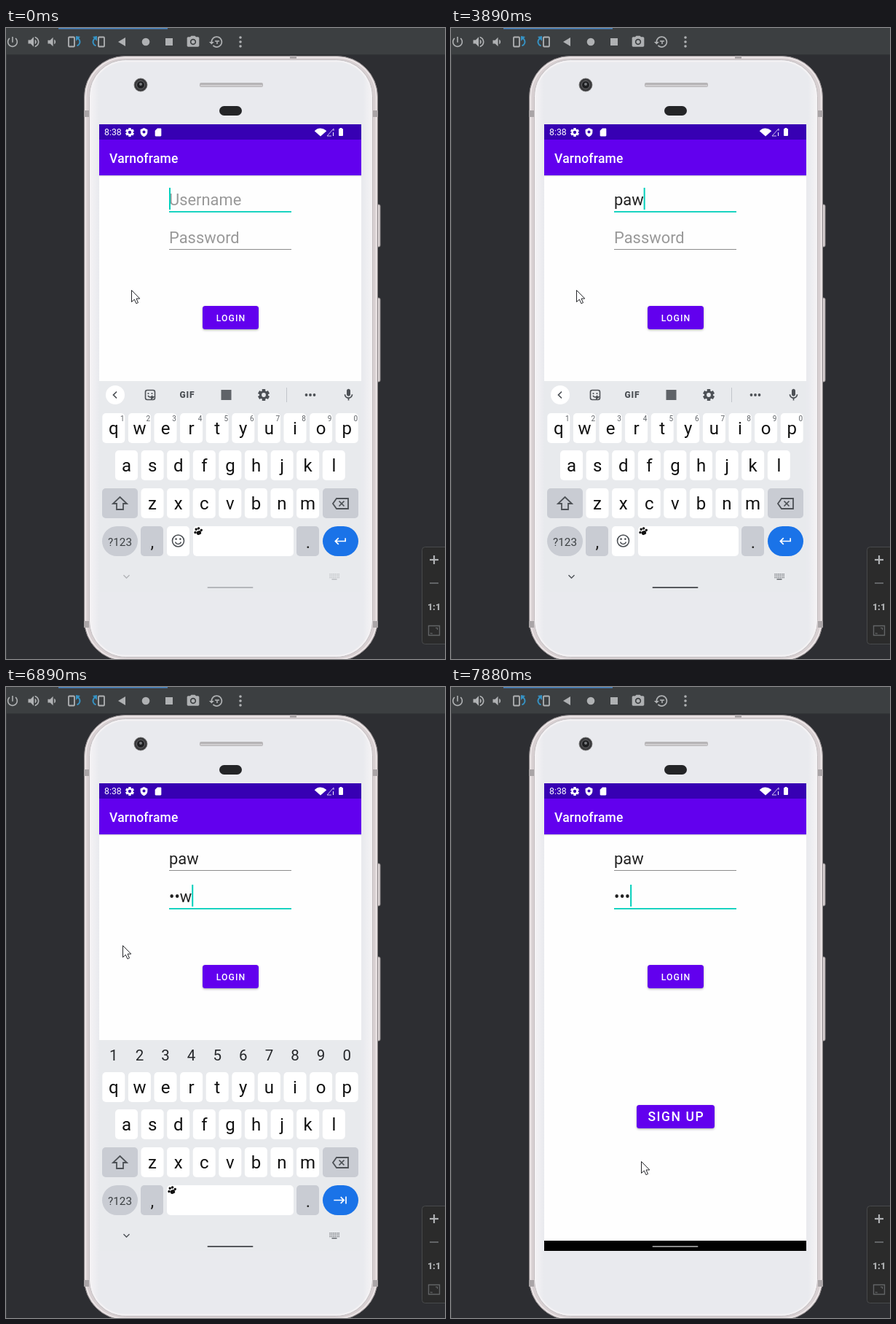
An HTML page with a canvas for the animation above (8 s loop, 603x865 px).

```html
<!DOCTYPE html>
<html lang="en">
<head>
<meta charset="utf-8">
<title>Login demo</title>
<style>
html, body { margin: 0; width: 100%; height: 100%; overflow: hidden; background: #2d2e32; }
canvas { display: block; width: 603px; height: 865px; }
</style>
</head>
<body>
<canvas id="stage" width="603" height="865"></canvas>
<script>
const c = document.getElementById('stage').getContext('2d');
const LOOP = 8000;
const PURPLE = '#6200ee', TEAL = '#03cfbb', KEYS = '#e8eaed', MOD = '#c9ccd3', INK = '#4d5156', TOOL = '#afb1b3';

// Step timelines: [start ms, value...]
const USER = [[0, ''], [1480, 'p'], [1600, 'pa'], [1910, 'paw']];
const PASS = [[0, ''], [5000, 'p'], [5400, '•a'], [5770, '••w'], [7280, '•••']];
const CARET = [[0, 1], [150, 0], [540, 1], [1080, 0], [1480, 1], [2430, 0], [2960, 1], [3360, 0], [3890, 1],
  [4700, 0], [5000, 1], [6310, 0], [6740, 1], [7280, 0], [7730, 1]];
const NAV = [[0, .35], [150, .5], [420, .6], [540, .7], [810, .85], [1080, 1]];
const MOUSE = [[0, 172, 359], [4700, 170, 360], [4850, 168, 361], [5770, 165, 355], [5920, 162, 344], [6040, 161, 339],
  [6860, 160, 354], [7010, 158, 470], [7160, 160, 620], [7280, 164, 738], [7430, 166, 755], [7580, 177, 733],
  [7730, 182, 728], [7880, 261, 650]];

const ICON = {
  power: 'M13 3h-2v10h2V3zm4.83 2.17l-1.42 1.42C17.99 7.86 19 9.81 19 12c0 3.87-3.13 7-7 7s-7-3.13-7-7c0-2.19 1.01-4.14 2.58-5.42L6.17 5.17C4.23 6.82 3 9.26 3 12c0 4.97 4.03 9 9 9s9-4.03 9-9c0-2.74-1.23-5.18-3.17-6.83z',
  loud: 'M3 9v6h4l5 5V4L7 9H3zm13.5 3c0-1.77-1.02-3.29-2.5-4.03v8.05c1.48-.73 2.5-2.25 2.5-4.02zM14 3.23v2.06c2.89.86 5 3.54 5 6.71s-2.11 5.85-5 6.71v2.06c4.01-.91 7-4.49 7-8.77s-2.99-7.86-7-8.77z',
  quiet: 'M5 9v6h4l5 5V4L9 9H5zm13.5 3c0-1.77-1.02-3.29-2.5-4.03v8.05c1.48-.73 2.5-2.25 2.5-4.02z',
  camera: 'M9 2L7.17 4H4c-1.1 0-2 .9-2 2v12c0 1.1.9 2 2 2h16c1.1 0 2-.9 2-2V6c0-1.1-.9-2-2-2h-3.17L15 2H9zm3 15c-2.76 0-5-2.24-5-5s2.24-5 5-5 5 2.24 5 5-2.24 5-5 5z',
  history: 'M13 3c-4.97 0-9 4.03-9 9H1l4 4 4-4H6c0-3.87 3.13-7 7-7s7 3.13 7 7-3.13 7-7 7c-1.93 0-3.68-.79-4.94-2.06l-1.42 1.42C8.27 19.99 10.51 21 13 21c4.97 0 9-4.03 9-9s-4.03-9-9-9z',
  shield: 'M12 1L3 5v6c0 5.55 3.84 10.74 9 12 5.16-1.26 9-6.45 9-12V5l-9-4z',
  card: 'M18 2h-8L4 8v12c0 1.1.9 2 2 2h12c1.1 0 2-.9 2-2V4c0-1.1-.9-2-2-2z',
  mic: 'M12 14c1.66 0 3-1.34 3-3V5c0-1.66-1.34-3-3-3S9 3.34 9 5v6c0 1.66 1.34 3 3 3zm5-3c0 2.76-2.24 5-5 5s-5-2.24-5-5H5c0 3.53 2.61 6.43 6 6.92V21h2v-3.08c3.39-.49 6-3.39 6-6.92h-2z',
  enter: 'M19 7v4H5.83l3.58-3.59L8 6l-6 6 6 6 1.41-1.41L5.83 13H21V7z',
  tab: 'M11.59 7.41L15.17 11H1v2h14.17l-3.59 3.59L13 18l6-6-6-6-1.41 1.41zM20 6v12h2V6h-2z'
};
const SHAPE = {};
for (const id in ICON) SHAPE[id] = Reflect.construct(Path2D, [ICON[id]]);

function at(list, t) {
  let hit = list[0];
  for (const row of list) if (row[0] <= t) hit = row;
  return hit;
}
function rect(x, y, w, h, fill) {
  c.fillStyle = fill;
  c.fillRect(x, y, w, h);
}
function round(x, y, w, h, r, fill, stroke, lw = 1) {
  c.beginPath();
  c.roundRect(x, y, w, h, r);
  if (fill) { c.fillStyle = fill; c.fill(); }
  if (stroke) { c.strokeStyle = stroke; c.lineWidth = lw; c.stroke(); }
}
function disc(x, y, r, fill, stroke, lw = 1) {
  round(x - r, y - r, 2 * r, 2 * r, r, fill, stroke, lw);
}
function line(color, lw, ...pts) {
  c.beginPath();
  for (let i = 0; i < pts.length; i += 2) c.lineTo(pts[i], pts[i + 1]);
  c.strokeStyle = color;
  c.lineWidth = lw;
  c.stroke();
}
function poly(fill, ...pts) {
  c.beginPath();
  for (let i = 0; i < pts.length; i += 2) c.lineTo(pts[i], pts[i + 1]);
  c.closePath();
  c.fillStyle = fill;
  c.fill();
}
function text(s, x, y, size, color, { weight = 400, align = 'left', gap = 0 } = {}) {
  c.font = `${weight} ${size}px Roboto, sans-serif`;
  c.letterSpacing = gap + 'px';
  c.textAlign = align;
  c.fillStyle = color;
  c.fillText(s, x, y);
  const w = c.measureText(s).width;
  c.letterSpacing = '0px';
  return w;
}
function icon(name, x, y, size, color) {
  c.save();
  c.translate(x - size / 2, y - size / 2);
  c.scale(size / 24, size / 24);
  c.fillStyle = color;
  c.fill(SHAPE[name]);
  c.restore();
}
function gear(x, y, r, color, hole) {
  c.save();
  c.translate(x, y);
  for (let i = 0; i < 6; i++) {
    c.rotate(Math.PI / 3);
    rect(-r * .28, -r, r * .56, r, color);
  }
  c.restore();
  disc(x, y, r * .76, color);
  disc(x, y, r * .36, hole);
}

function toolbar() {
  rect(0, 0, 603, 865, '#2d2e32');
  rect(0, 0, 603, 36, '#3c3f41');
  rect(0, 36, 603, 1, '#323537');
  rect(0, 36, 1, 829, '#3b3d40');
  rect(72, 0, 150, 1.5, '#4a88c7');
  icon('power', 9, 19, 19, TOOL);
  icon('loud', 38, 19, 20, TOOL);
  icon('quiet', 63, 19, 19, TOOL);
  for (const [x, dir] of [[94, 1], [127, -1]]) {
    c.save();
    c.translate(x, 19);
    c.scale(dir, 1);
    round(-8, -6.5, 8, 13, 1, null, TOOL, 1.8);
    c.beginPath();
    c.arc(2, 0, 5.5, -1.2, 1.3);
    c.strokeStyle = '#3592c4';
    c.lineWidth = 2;
    c.stroke();
    poly('#3592c4', 2, -8, 2, -1, 8, -7);
    c.restore();
  }
  poly(TOOL, 154, 19, 164, 13, 164, 25);
  disc(192, 19, 5.3, TOOL);
  rect(219, 14, 10, 10, TOOL);
  icon('camera', 257, 19, 20, TOOL);
  disc(257, 19, 2.5, TOOL);
  icon('history', 288.5, 19, 21, TOOL);
  line(TOOL, 1.6, 287, 18, 293, 18);
  line(TOOL, 1.6, 290, 18, 290, 22);
  for (let i = -1; i < 2; i++) disc(322, 19 + i * 6, 1.8, TOOL);
}

function zoomPanel() {
  round(571.5, 711.5, 40, 133, 4, '#2b2b2b', '#484a4c');
  line(TOOL, 2.2, 582, 729, 594, 729);
  line(TOOL, 2.2, 588, 723, 588, 735);
  line('#626466', 2, 582, 761, 594, 761);
  text('1:1', 588, 798, 12.5, TOOL, { weight: 800, align: 'center' });
  round(580.5, 819.5, 15, 13, 0, null, '#626466', 1.4);
  line('#626466', 1.2, 583.5, 829, 583.5, 830, 586, 830);
  line('#626466', 1.2, 590, 822.5, 592.5, 822.5, 592.5, 825);
}

function phone() {
  for (const [y, h] of [[242, 58], [370, 115]]) round(509, y, 5, h, 2, '#d9d2d3', '#8d8889');
  round(107.5, 38.5, 403, 829, 56, '#d8d0d2', '#8f8a8c');
  round(109.5, 40.5, 399, 825, 54, null, '#efe9ea', 1.5);
  for (const y of [113, 813]) {
    rect(107, y, 7, 9, '#aaa5a7');
    rect(504, y, 7, 9, '#aaa5a7');
  }
  rect(390, 38, 9, 4, '#aaa5a7');
  const g = c.createLinearGradient(114, 0, 504, 0);
  g.addColorStop(0, '#f6f4f6');
  g.addColorStop(.035, '#e9eaee');
  g.addColorStop(.965, '#e9eaee');
  g.addColorStop(1, '#f6f4f6');
  round(114.5, 43.5, 389, 819, 50, g, '#c3bec0');
  round(116.5, 45.5, 385, 815, 48, null, '#f4f2f4', 2);
  disc(185, 78, 9, '#39393b', '#777', .8);
  disc(185, 78, 5.5, '#1d1e20', '#68686b', 1);
  disc(185, 77, 2, '#77797c');
  round(266, 75, 87, 6, 2, '#b7b5b7');
  rect(267, 78, 85, 2, '#cfcdcf');
  round(293, 107, 31, 13, 6.5, '#242527');
}

function button(label, x, y, w, size, base) {
  c.save();
  c.shadowColor = 'rgba(0,0,0,.3)';
  c.shadowBlur = 3;
  c.shadowOffsetY = 1.2;
  round(x, y, w, 32, 3.5, PURPLE);
  c.restore();
  const gap = size * .0893;
  text(label, x + w / 2 + gap / 2, base, size, '#fff', { weight: 500, align: 'center', gap });
}

function field(value, hint, y, focus, caret) {
  const w = text(value || hint, 224, y, 21.9, value ? '#212121' : '#999');
  if (focus) rect(224, y + 8, 168, 1.8, TEAL);
  else rect(224, y + 8, 168, 1, '#8c8c8c');
  if (focus && caret) rect(224 + (value ? w : 0), y - 24, 2, 30, TEAL);
}

function app(t) {
  rect(128, 132, 360, 641, '#fefefe');
  rect(128, 202, 360, 1, '#d9d9dc');
  rect(128, 203, 360, 1, '#f2f2f4');
  rect(128, 132, 360, 21, '#3700b3');
  rect(128, 153, 360, 49, PURPLE);
  text('8:38', 135, 147, 12.3, '#fff');
  gear(170, 143, 6, '#fff', '#3700b3');
  icon('shield', 189.5, 143, 13, '#fff');
  disc(189.5, 142.5, 2, '#3700b3');
  icon('card', 209, 143, 13, '#fff');
  c.beginPath();
  c.moveTo(432, 148.5);
  c.arc(432, 148.5, 11, -Math.PI * .77, -Math.PI * .23);
  c.fillStyle = '#fff';
  c.fill();
  line('#cfc3ee', 1, 441, 148, 450, 138, 450, 141);
  line('#cfc3ee', 1, 441, 148, 447, 148);
  line('#fff', 1, 449.5, 143, 449.5, 148);
  round(457, 138, 6, 10, 1, '#fff');
  rect(458.5, 137, 3, 2, '#fff');
  text('Varnoframe', 142, 184.5, 17.5, '#fff', { weight: 500, gap: .22 });

  const second = t >= 4170, caret = at(CARET, t)[1];
  field(at(USER, t)[1], 'Username', 243, !second, caret);
  field(at(PASS, t)[1], 'Password', 295, second, caret);
  button('LOGIN', 270, 381, 77, 12.25, 402);
  button('SIGN UP', 255, 573, 107, 17.5, 595);
}

function key(x, y, w, fill = '#fff', r = 5) {
  round(x, y, w, 41, r, fill);
}
function letters(row, x, y) {
  [...row].forEach((ch, i) => {
    const mid = x + i * 35.6;
    key(mid - 15.5, y, 31);
    text(ch, mid, y + 28.5, 24, '#111', { align: 'center' });
  });
}
function paw(x, y) {
  c.save();
  c.translate(x, y);
  c.rotate(-.35);
  for (const [dx, dy] of [[-4.3, 0], [-1.6, -3.6], [2, -3.6], [4.6, 0]]) disc(dx, dy, 1.7, '#111');
  round(-3.2, -.5, 6.6, 5.4, 2.6, '#111');
  c.restore();
}
function tools() {
  disc(150, 503, 13, '#fff');
  line(INK, 1.7, 152, 498.5, 147.5, 503, 152, 507.5);
  round(191.5, 496.5, 13, 13, 2.5, null, INK, 1.6);
  poly(INK, 199, 510, 199, 505, 205, 505);
  disc(195.5, 501, 1.1, INK);
  disc(200.5, 501, 1.1, INK);
  c.beginPath();
  c.arc(198, 503, 3, .2, 2.9);
  c.stroke();
  text('GIF', 249, 507, 12, INK, { weight: 900, align: 'center', gap: .8 });
  rect(295.5, 496, 14, 14, '#5f6368');
  gear(354, 503, 8, INK, KEYS);
  rect(385, 493, 1, 20, '#c2c5ca');
  for (let i = -1; i < 2; i++) disc(418 + i * 5.5, 503, 1.9, INK);
  icon('mic', 470.5, 503, 20, INK);
}
function keyboard(t) {
  const digits = t >= 4170;
  rect(128, 484, 360, 289, KEYS);
  if (!digits) tools();
  letters('qwertyuiop', 147.8, 528);
  [...'1234567890'].forEach((d, i) => {
    const x = 147.8 + i * 35.6;
    if (digits) text(d, x, 511.5, 20.5, '#26282b', { align: 'center' });
    else text(d, x + 12, 538.5, 10, '#5f6368', { align: 'center' });
  });
  letters('asdfghjkl', 165.5, 579);
  letters('zxcvbnm', 201, 631);

  key(132, 631, 49, MOD);
  line(INK, 1.8, 156.5, 643, 166, 652, 161, 652, 161, 660, 152, 660, 152, 652, 147, 652, 156.5, 643, 158, 644.4);
  key(435, 631, 49, MOD);
  line(INK, 1.8, 454, 645, 470, 645, 470, 659, 454, 659, 449, 652, 454, 645, 456, 645);
  line(INK, 1.7, 457.5, 648.5, 464.5, 655.5);
  line(INK, 1.7, 464.5, 648.5, 457.5, 655.5);

  key(132, 683, 49, MOD, 20.5);
  text('?123', 156.5, 709.5, 15.3, '#3c4043', { align: 'center' });
  key(185, 683, 31, MOD);
  text(',', 200.8, 712.5, 24, '#222', { align: 'center' });
  if (!digits) {
    key(221, 683, 31);
    disc(236.5, 703, 8, null, INK, 1.6);
    disc(233.6, 700.6, 1.3, INK);
    disc(239.4, 700.6, 1.3, INK);
    c.beginPath();
    c.arc(236.5, 703.5, 4, .25, 2.9);
    c.lineWidth = 1.5;
    c.stroke();
  }
  const left = digits ? 221 : 257;
  key(left, 683, 395 - left);
  paw(left + 7, 690);
  key(399, 683, 31, MOD);
  text('.', 415, 712.5, 24, '#222', { align: 'center' });
  key(435, 683, 49, '#1a73e8', 20.5);
  icon(digits ? 'tab' : 'enter', 459.5, 703.5, 20, '#fff');
}

function navBar(t) {
  c.save();
  c.globalAlpha *= at(NAV, t)[1];
  if (t >= 7430) round(152, 731, 27, 41, 13.5, '#d3d5d9');
  line(INK, 1.4, 161.5, 750, 165.5, 754, 169.5, 750);
  for (let r = 0; r < 3; r++)
    for (let i = 0; i < 6; i++) rect(444.5 + i * 2.4, 748 + r * 2.4, 1.3, 1.3, '#5f6368');
  rect(447.5, 755, 7, 1.4, '#5f6368');
  round(276.5, 766, 63, 2, 1, '#55585c');
  c.restore();
}

function pointer(x, y) {
  c.save();
  c.translate(x + .5, y + .5);
  poly('#fff', 0, 0, 0, 16, 3.8, 12.6, 6.4, 18.2, 9, 17, 6.5, 11.5, 11.3, 11.5);
  c.strokeStyle = '#25262a';
  c.lineWidth = 1;
  c.stroke();
  c.restore();
}

function draw(t) {
  toolbar();
  zoomPanel();
  phone();
  c.save();
  c.beginPath();
  c.rect(128, 132, 360, 641);
  c.clip();
  app(t);
  if (t < 7580) {
    keyboard(t);
    navBar(t);
  } else {
    const leaving = t < 7730;
    if (leaving) {
      // Keyboard slides away while fading
      c.save();
      c.globalAlpha = .37;
      c.translate(0, 94);
      keyboard(t);
      c.restore();
    }
    rect(128, 759, 360, 14, leaving ? '#484a4a' : '#000');
    round(276.5, 766, 63, 2, 1, leaving ? '#1c1c1c' : t < 7880 ? '#5c5c5c' : '#8a8a8a');
  }
  c.restore();
  const [, x, y] = at(MOUSE, t);
  pointer(x, y);
}

const start = performance.now();
function tick() {
  draw((performance.now() - start) % LOOP);
  requestAnimationFrame(tick);
}
tick();
</script>
</body>
</html>
```
